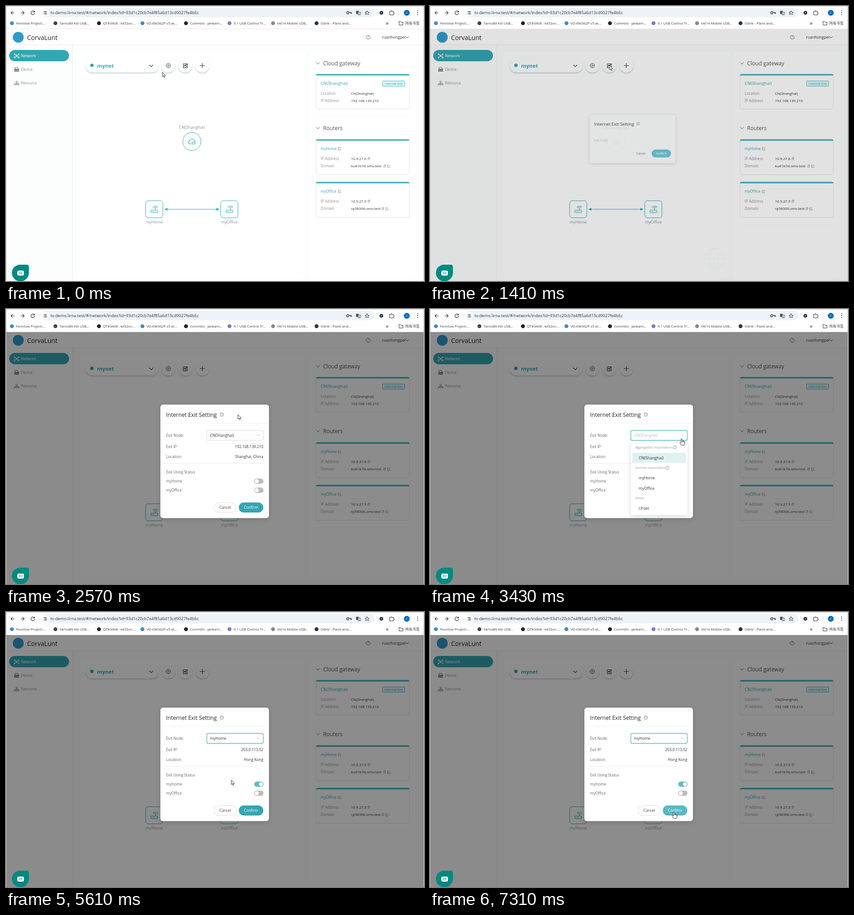
These frames come from a looping animation (922x607 px, 8000 ms). An HTML page:

```html
<!DOCTYPE html>
<html lang="en">
<head>
<meta charset="utf-8">
<title>Network console</title>
<style>
html, body { margin: 0; width: 100%; height: 100%; overflow: hidden; background: #fff; }
svg { display: block; width: 100vw; height: 100vh; font-family: "Open Sans", "Noto Sans", sans-serif; }
.line { fill: none; stroke-linecap: round; stroke-linejoin: round; }
.raised { filter: drop-shadow(0 2px 1.5px rgba(40, 90, 100, .28)); }
.float { filter: drop-shadow(0 2px 5px rgba(0, 0, 0, .16)); }
</style>
</head>
<body>
<svg id="stage" viewBox="0 0 922 607"></svg>
<script>
const TEAL = '#35a5b2', INK = '#333', GREY = '#909090';

const text = (x, middle, s, size, fill = INK, extra = '') =>
  `<text x="${x}" y="${middle + size * .36}" font-size="${size}" fill="${fill}" ${extra}>${s}</text>`;
const rect = (x, y, w, h, r, fill, extra = '') =>
  `<rect x="${x}" y="${y}" width="${w}" height="${h}" rx="${r}" fill="${fill}" ${extra}/>`;
const dot = (x, y, r, fill, extra = '') => `<circle cx="${x}" cy="${y}" r="${r}" fill="${fill}" ${extra}/>`;
const line = (d, color = INK, width = 1, extra = '') =>
  `<path class="line" d="${d}" stroke="${color}" stroke-width="${width}" ${extra}/>`;
const ring = (x, y, r, color, width = 1) => dot(x, y, r, 'none', `stroke="${color}" stroke-width="${width}"`);
const chevron = (x, y, size = 3.5, color = INK, width = 1) =>
  line(`M${x - size} ${y - size / 2}l${size} ${size}l${size} ${-size}`, color, width);
const group = (id, content, extra = '') => `<g id="${id}" ${extra}>${content}</g>`;
const help = (x, y, r = 4, color = '#555') =>
  ring(x, y, r, color, .8) + text(x, y, '?', r * 1.6, color, 'text-anchor="middle"');
const editIcon = (x, y, color = GREY) =>
  line(`M${x} ${y - 2.5}h-2.5v5.5h5.5v-2.5M${x - .5} ${y + .5}l3.2 -3.4`, color, .9);
const copyIcon = (x, y) => line(`M${x - 2} ${y - 1.2}v3.8h3v-3.8zM${x - .7} ${y - 2.6}h3v3.8`, GREY, .8);
const right = 'text-anchor="end"', center = 'text-anchor="middle"';

function browserBar() {
  const bookmarks = [
    [13, '#3d8fc4', 'Fennlow Project:...'], [109, '#444', 'TarnoBit Kel USB...'],
    [205, '#222', 'QT#3408 : ke52vv:...'], [301, '#3d8fc4', 'VD-KM362P v5 at...'],
    [397, '#222', 'Commits · pelkarn...'], [493, '#8377c4', '9.1 USB Control Tr...'],
    [589, '#888', 'Vel14 Mobile USB...'], [685, '#273142', 'Odrik - Plans and...']];
  return rect(0, 0, 922, 51, 0, '#fff') + rect(78, 4, 735, 21, 10.5, '#eef2f9') +
    line('M18 15h-7m3.3 -3.3l-3.3 3.3l3.3 3.3M33 15h7m-3.3 -3.3l3.3 3.3l-3.3 3.3', INK, 1.2) +
    line('M62.5 13a4 4 0 1 0 .5 3M63 10.8v2.7h-2.7', INK, 1.2) +
    dot(86.5, 15, 8, '#fff') + line('M83 13h2m3 0h2.5M83 17.2h3m3 0h1.5', INK, 1) +
    ring(86.5, 13, 1.3, INK) + ring(87.5, 17.2, 1.3, INK) +
    text(98, 15, 'tv-demo.lirna.test/#/network/index?id=93d1c20cb7e4f85a6d13cd9027fe4b6c', 9.15, '#30343a') +
    ring(754, 15, 2.5, INK, 1.3) + line('M757 14h5v2.5h-2v-2', INK, 1.2) +
    rect(772, 10.5, 6, 7, 1, '#555') + rect(776.5, 13, 5.5, 6.5, 1, '#fff', 'stroke="#444" stroke-width=".9"') +
    text(779.2, 16.2, '文', 4.5, INK, center + ' font-family="Noto Sans CJK SC, sans-serif"') +
    line('M796.5 10.5l1.3 3l3.3 .3l-2.5 2.1l.8 3.2l-2.9 -1.7l-2.9 1.7l.8 -3.2l-2.5 -2.1l3.3 -.3z', INK, 1) +
    dot(828, 15, 4, '#1d2b52') + dot(828, 15, 1.2, '#d5def5') +
    line('M846.5 12h2.5a1.4 1.4 0 1 1 2.8 0h3v2.7a1.4 1.4 0 1 1 0 2.8v2.3h-8.3z', INK, 1.1) +
    line('M866.5 10v10', '#cfd9ea') + dot(884, 15, 6.5, '#0b6bbd') + text(884, 14.6, 'c', 7, '#fff', center) +
    [11, 15, 19].map(y => dot(908, y, 1.1, INK)).join('') +
    bookmarks.map(([x, color, name]) => dot(x, 38, 4.3, color) + text(x + 9, 38.3, name, 7.7, '#3c3c3c')).join('') +
    text(837.5, 37, '»', 13) + line('M867 35v7h8.5v-6h-4.2l-1.2 -1.5h-3.1z', INK, 1) +
    text(881, 38.3, '所有书签', 7.8, '#3c3c3c', 'font-family="Noto Sans CJK SC, sans-serif"') +
    line('M0 50.5H922', '#e4e7ec');
}

function sidebar() {
  return rect(7, 97, 132, 25, 12.5, TEAL) +
    line('M20 107l3.5 3l4 -3.5M23.5 110l-4 3.5M23.5 110l4 3.5', '#fff', .9) +
    [[19, 106.5], [28, 106.5], [19, 113.5], [28, 113.5]].map(p => ring(...p, 1.4, '#fff', .9)).join('') +
    ring(23.5, 110, 1.8, '#fff', .9) + text(33, 110, 'Network', 8.3, '#fff') +
    line('M19.5 139l1.5 -3.5h4.5l1.5 3.5', '#777', 1.2) + rect(18, 139, 11, 2.7, .6, '#777') +
    rect(18, 142.4, 11, 2.3, .6, '#777') + text(33, 140, 'Device', 8.3, GREY) +
    ring(23.5, 167.5, 1.8, '#777') + line('M23.5 169.5v2M19.5 172.5v-1.5h8v1.5', '#777', .9) +
    [19.3, 23.5, 27.7].map(x => ring(x, 173.2, 1.4, '#777', .9)).join('') + text(33, 170, 'Resource', 8.1, GREY);
}

function card(y, h, title, rows, isRouter) {
  return rect(684, y - .5, 205.5, h, 4, '#fff', 'stroke="#e2e4e5"') +
    `<path d="M683.5 ${y + 3}q0 -3.5 4 -3.5h198.500q4 0 4 3.500z" fill="#4fb4bf" transform="translate(0 -.5)"/>` +
    text(694, y + 20, title, isRouter ? 8.3 : 9.5, TEAL) + (isRouter ? editIcon(735.5, y + 20) : '') +
    rows.map(([key, value, ...icons], i) => {
      const rowY = y + 42 + i * 16.4;
      return text(694, rowY, key, 8.3, GREY) + text(761, rowY, value, 8) +
        icons.map((x, k) => (k ? editIcon : copyIcon)(x, rowY)).join('');
    }).join('');
}

function router(x, label) {
  return rect(x - 19, 429.8, 38, 37.8, 6, '#fff', `stroke="${TEAL}"`) +
    rect(x - 7.5, 450.5, 15, 5.5, 1.5, 'none', `stroke="${TEAL}" stroke-width="1.1"`) +
    line(`M${x + 2.5} 450v-4M${x - 1} 446q3.5 -3 7 0M${x - 3} 443.8q5.5 -4.6 11 0M${x - 4.5} 453.3h1m2 0h1`, TEAL, 1.1) +
    text(x, 477, label, 8.9, GREY, center);
}

function app() {
  const gear = [...Array(8)].map((_, i) => {
    const at = (angle, r) => `${(358 + r * Math.cos(angle)).toFixed(2)} ${(131.5 + r * Math.sin(angle)).toFixed(2)}`;
    const a = i * Math.PI / 4;
    return [at(a - .22, 5), at(a + .22, 5), at(a + .34, 4), at(a + .45, 4)].join('L');
  }).join('L');
  return rect(0, 51, 922, 556, 0, '#fcfdfd') + rect(0, 51, 922, 34, 0, '#fff') +
    line('M0 85.5H922M146.5 86V607', '#eceeee') +
    rect(161, 101, 498, 498, 4, '#fff') + rect(669, 101, 236, 498, 4, '#fff') +
    dot(27, 69, 12, '#2f9bcb') + text(46.5, 70, 'CorvaLunt', 14, '#222') +
    help(799, 69, 4.3) + text(829.5, 69, 'ruanhongpei', 8.6) + chevron(884.5, 69) + sidebar() +
    rect(176, 117, 160, 29.5, 14, '#fff', 'class="raised"') + dot(189.5, 131, 3.8, TEAL) +
    text(201, 132, 'mynet', 11.4, TEAL, 'font-weight="700"') + chevron(320.5, 132, 4, '#444', 1.1) +
    [358, 395.5, 433].map(x => dot(x, 132, 15, '#fff', 'class="raised"')).join('') +
    line(`M${gear}z`, '#444', 1) + ring(358, 131.5, 1.6, '#444') +
    line('M397 127.5h-6v9h9v-5M393 133.8a2.4 2.4 0 1 1 2.8 1.4M395 132l5 -4.5m-3 0h3v3', INK, 1.1) +
    line('M428 131.5h10M433 126.5v10', INK, 1.2) +
    text(410, 268, 'CN(Shanghai)', 9.2, GREY, center) +
    group('cloud', dot(410, 299, 20, '#fff', `stroke="${TEAL}"`) +
      line('M408.5 304.5h-3a3.5 3.5 0 0 1 -.4 -6.9a5 5 0 0 1 9.8 -.6q2 .6 2.1 2.5', TEAL, 1.2) +
      rect(410.5, 300, 6.5, 4.7, 1, '#fff', `stroke="${TEAL}" stroke-width="1.1"`)) +
    line('M353 448.7H467', TEAL) + `<path d="M349 448.7l7 -3v6zM471 448.7l-7 -3v6z" fill="${TEAL}"/>` +
    router(327, 'myHome') + router(492.7, 'myOffice') +
    chevron(688, 126.5, 3.5, '#555') + text(699.5, 127, 'Cloud gateway', 12, '#555') +
    card(151, 77, 'CN(Shanghai)', [['Location', 'CN(Shanghai)'], ['IP Address', '192.168.139.210']]) +
    rect(830.5, 165.5, 49, 11.5, 1.5, '#e2f7f8', 'stroke="#3fbac5"') + text(855, 171.2, 'Internet Exit', 7, TEAL, center) +
    line('M684 243.5H890M684 483.5H890', '#f8f9f9') +
    chevron(688, 269.5, 3.5, '#555') + text(699.5, 270, 'Routers', 11.8, '#555') +
    card(295, 78, 'myHome', [['IP Address', '10.9.27.6', 800], ['Domain', 'ku41b7d.omv.test', 835, 844]], true) +
    card(389, 78, 'myOffice', [['IP Address', '10.9.27.5', 800], ['Domain', 'rp58306.omv.test', 831, 840]], true);
}

const toggle = (id, y) => rect(547.5, y - 5.7, 20.5, 11.4, 5.7, '#bcbcbc', `id="${id}"`) + dot(553.3, y, 4.4, '#fff', `id="${id}Knob"`);

function modal() {
  const label = (y, s) => text(353, y, s, 8.3, '#666');
  const head = text(353, 233.5, 'Internet Exit Setting', 12.2, '#222', 'font-weight="500"') + help(476, 233, 3.8) +
    group('nodeLabel', label(279, 'Exit Node:'));
  const details = line('M341 252.5H580', '#f3f3f3') +
    rect(443, 268, 124.5, 22, 3, '#fff', 'id="select" stroke="#d9d9d9"') +
    text(450, 279, 'CN(Shanghai)', 8.4, INK, 'id="selected"') + chevron(557, 279, 3, '#b5b5b5', .9) +
    label(304.5, 'Exit IP:') + label(326, 'Location:') +
    text(567.5, 304.5, '', 8.2, INK, 'id="exitIp" ' + right) + text(567.5, 326, '', 8.3, INK, 'id="place" ' + right) +
    line('M353 340.5H568', '#ebebeb') + label(360.5, 'Exit Using Status') +
    label(380.3, 'myHome') + toggle('homeToggle', 380) + label(400.3, 'myOffice') + toggle('officeToggle', 400);
  const foot = rect(459.5, 427.5, 48.5, 21.5, 10.7, 'none', 'id="cancel" stroke="#dedede"') +
    text(483.5, 438.3, 'Cancel', 8.2, '#444', center) +
    rect(513.5, 427, 54, 22.3, 11.1, TEAL, 'id="confirm"') + text(540.3, 438.3, 'Confirm', 8.2, '#fff', center);
  return rect(340.5, 211, 239.5, 250.5, 6, '#fff', 'id="panel" class="float"') +
    group('head', head) + group('details', details) + group('foot', foot);
}

function dropdown() {
  const section = (y, s) => text(452.5, y, s, 7.25, '#999');
  const option = (y, s, size = 8.3) => text(460.5, y, s, size);
  return rect(443, 295, 125, 159.5, 3, '#fff', 'class="float"') + rect(446, 317.5, 119, 22, 2, '#e0f1f1') +
    section(305.5, 'Aggregation exportation') + help(540, 305.5, 3.7, '#888') + option(328.5, 'CN(Shanghai)', 8.7) +
    section(350.3, 'Normal exportation') + help(523.5, 350.3, 3.7, '#888') +
    option(373.5, 'myHome') + option(396, 'myOffice') + section(417.5, 'Other') + option(440.5, 'Unset');
}

const globe = ring(627, 558, 23, '#dadddd') +
  '<ellipse cx="627" cy="558" rx="10" ry="23" fill="none" stroke="#dadddd"/>' +
  line('M604 558h46M627 535v46M607 547h40M607 569h40', '#dadddd');
const chat = '<path d="M31.500 571H45.500q5 0 5 5V589a18.500 18.500 0 0 1 -37.500 0a18 18 0 0 1 18.500 -18z" fill="#008981"/>' +
  rect(25, 584, 14.5, 11, 3, '#fff') + line('M28.5 588h7.5M28.5 591h7.5', '#008981', 1.1);
const arrow = '<path d="M0 0V10L2.3 7.9L3.9 11.4L5.5 10.7L3.9 7.3H7Z" fill="#fff" stroke="#222" stroke-width=".9"/>';
const hand = '<path d="M-1.3 1Q0 -.8 1.2 1V5.2Q2.6 4.2 3.3 5.6Q4.8 4.9 5.3 6.2Q7 5.8 7 7.6V10.5L5.8 14.5H-.3L-3.8 9.3Q-3.8 7.5 -1.3 9Z' +
  'M1.2 5.2V8M3.3 5.6V8.2M5.3 6.2V8.5" fill="#fff" stroke="#222" stroke-width=".9" stroke-linejoin="round"/>';

document.getElementById('stage').innerHTML = browserBar() + app() +
  group('overlay', rect(0, 51, 922, 556, 0, '#000')) + group('globe', globe) +
  group('modal', modal()) + group('dropdown', dropdown()) + chat +
  line('M.5 0V607M921.5 0V607M0 .5H922', '#c4c7ca') +
  group('cursor', group('arrow', arrow) + group('hand', hand));

const el = id => document.getElementById(id);
const set = (id, attributes) => { for (const key in attributes) el(id).setAttribute(key, attributes[key]); };
const show = (id, visible) => set(id, { visibility: visible ? 'visible' : 'hidden' });

// Share of a move done when it advances in even jumps, the first at start and the last at end.
function stepped(t, start, end, steps) {
  if (t < start) return 0;
  const done = end > start ? 1 + Math.floor((t - start) / (end - start) * (steps - 1) + .01) : 1;
  return Math.min(done, steps) / steps;
}

// Cursor moves: start, end, steps, x, y
const moves = [
  [120, 850, 6, 396, 131], [1990, 2850, 7, 558, 274], [3430, 3430, 1, 555, 286], [3570, 3710, 2, 519, 365],
  [3990, 4570, 5, 497, 388], [4880, 4880, 1, 497, 371], [6200, 7170, 8, 538, 441]];

function cursorAt(t) {
  let x = 345, y = 146;
  for (const [start, end, steps, toX, toY] of moves) {
    const p = stepped(t, start, end, steps);
    x += (toX - x) * p;
    y += (toY - y) * p;
  }
  return [x, y];
}

function render(t) {
  const [x, y] = cursorAt(t);
  const compact = t >= 1410 && t < 1560;
  const overConfirm = t > 7000 && y > 427;
  const overSelect = t > 2400 && t < 5180 && x > 443 && y > 268;
  const pointing = (t >= 850 && t < 1410) || overSelect || overConfirm;
  set('cursor', { transform: `translate(${x} ${y})` });
  show('arrow', !pointing);
  show('hand', pointing);

  set('overlay', { opacity: t < 1410 ? 0 : compact ? .115 : .45 });
  show('globe', compact);
  set('cloud', { opacity: compact ? .3 : 1 });
  show('modal', t >= 1410);
  const scale = compact ? .79 : t < 1690 ? .99 : 1;
  set('modal', { transform: `translate(396 135) scale(${scale}) translate(-396 -135)`, opacity: compact ? .85 : 1 });
  set('panel', { y: compact ? 268 : 211, height: compact ? 135 : 250.5, fill: compact ? '#e4e5e5' : '#fff' });
  set('head', { transform: `translate(0 ${compact ? 60 : 0})` });
  set('nodeLabel', { opacity: compact ? .5 : 1 });
  set('foot', { transform: `translate(0 ${compact ? -62 : 0})`, opacity: compact ? .85 : 1 });
  set('cancel', { 'stroke-opacity': compact ? 0 : 1 });
  set('details', { display: compact ? 'none' : 'inline' });

  const opening = stepped(t, 2850, 3000, 2), choosing = stepped(t, 5180, 5610, 4);
  set('dropdown', { opacity: opening * Math.max(0, 1 - choosing * 2) });
  set('select', { stroke: t >= 3000 ? '#5bbac4' : '#d9d9d9', 'stroke-width': t >= 3130 ? 1.4 : 1 });
  set('selected', { fill: t >= 3000 && !choosing ? '#bfbfbf' : INK });
  el('selected').textContent = choosing ? 'myHome' : 'CN(Shanghai)';
  const loaded = choosing >= .5;
  el('exitIp').textContent = loaded ? '203.0.113.52' : '192.168.139.210';
  el('place').textContent = loaded ? 'Hong Kong' : 'Shanghai, China';
  const on = Math.max(0, choosing * 2 - 1);
  set('homeToggle', { fill: on ? '#63b8c3' : '#bcbcbc' });
  set('homeToggleKnob', { cx: 553.3 + 9 * on });
  set('confirm', { fill: overConfirm ? '#58b9c3' : TEAL });
}

const started = performance.now();
function tick() {
  render((performance.now() - started) % 8000);
  requestAnimationFrame(tick);
}
tick();
</script>
</body>
</html>
```
